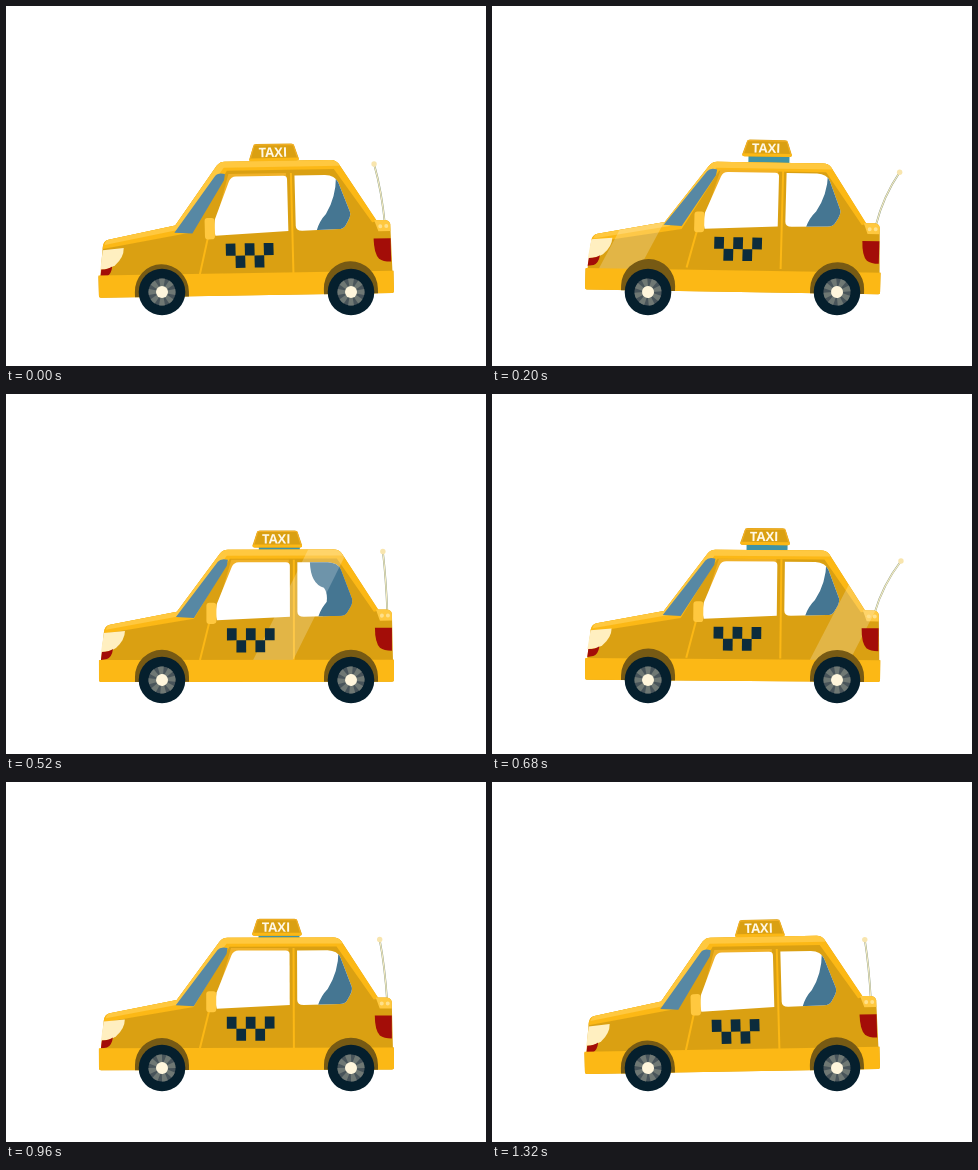
Write an HTML page that moves like this. It is 480 px wide and 360 px high and loops after 1360 ms.

```html
<!DOCTYPE html>
<html lang="en">
<head>
<meta charset="utf-8">
<title>Taxi</title>
<style>
  html, body { margin: 0; width: 100%; height: 100%; overflow: hidden; background: #fff; }
  svg { display: block; width: 100vw; height: 100vh; }
  text { font: 700 13px "Open Sans", sans-serif; fill: #fff8e6; }
  .amber { fill: #daa012; }
  .bright { fill: #fcb815; }
  .light { fill: #ffc83f; }
  .glass { fill: #5788a4; }
  .deep { fill: #457692; }
  .navy { fill: #0c2c3c; }
  .red { fill: #a30d08; }
  .cream { fill: #ffefc0; }
  .seam { fill: none; stroke: #fcb815; stroke-width: 2; }
</style>
</head>
<body>
<svg viewBox="0 0 480 360">
  <defs>
    <path id="shell" d="M93 267V286Q93 288 95 288H386Q388 288 388 286V266H387L386 220Q385 216 380 216H372L336 160Q333 156 328 156H222Q217 156 214 160L171 218L104 231Q99 232 98 238L95 266Z"/>
    <path id="plate" d="M247 151L251 139Q252 137 254 137H289Q291 137 292 139L296 151Q297 154 294 154H249Q246 154 247 151Z"/>
    <path id="rearPane" d="M291.500 168.500H322Q332 169 335 176L346 205Q347 209 344 214L341 219Q339 222 334 222L298 223Q291.500 223 291.500 218Z"/>
    <path id="frontPane" d="M211 226.500Q209 220 211 210L226 173Q228 168.500 233 168.500H280Q284 168.500 284 172V223Z"/>
    <clipPath id="paint"><use href="#shell"/><use href="#plate"/></clipPath>
    <clipPath id="rearClip"><use href="#rearPane"/></clipPath>
    <clipPath id="frontClip"><use href="#frontPane"/></clipPath>
    <g id="hub">
      <circle r="13.500" fill="#48545a"/>
      <g id="blades" fill="#6f7874"></g>
      <circle r="6" fill="#fff6dc"/>
    </g>
  </defs>

  <g id="antenna">
    <path id="rod" fill="none" stroke="#8b9b86" stroke-width="1.800"/>
    <path id="rodCore" fill="none" stroke="#f6ecc0" stroke-width="1.100"/>
    <circle id="tip" r="2.700" fill="#f8e5ae"/>
  </g>

  <g id="car">
    <rect x="253" y="149" width="41" height="8" fill="#4093a4"/>
    <g id="sign">
      <use href="#plate" class="amber"/>
      <path class="bright" d="M247 151H296Q297 154 294 154H249Q246 154 247 151Z"/>
      <path fill="none" stroke="#f3b026" d="M248 151L252 138H291L295 151"/>
      <text x="270.500" y="150" text-anchor="middle">TAXI</text>
    </g>

    <use href="#shell" class="amber"/>
    <path class="bright" d="M98 240Q98 232 104 231L171 218L214 160Q217 156 222 156H328Q333 156 336 160L373 217L368 218L331 165H224L188 225Z"/>
    <path class="light" d="M100 236Q101 231.500 104 231L171 218L214 160Q217 156 222 156H328Q333 156 336 160L337 162H221L176 222Z"/>
    <path class="light" d="M370 216H380Q385 216 386 220V227H374Z"/>

    <g class="side">
      <path class="glass" d="M170 223L212 168Q215 164 222 166L221 172L188 224Z"/>
      <path class="seam" d="M204 226L194 266M288 166V266"/>
      <path fill="none" stroke="#f0b127" stroke-width="4" d="M211 222L227 168H283"/>
      <use href="#frontPane" fill="#fff"/>
      <use href="#rearPane" fill="#fff"/>
      <g clip-path="url(#rearClip)">
        <path class="deep" d="M333 168L350 200V224H312Q315 214 322 207Q333 190 333 168Z"/>
        <path id="rearTint" class="deep" d="M304 166H340L350 205V225H316Q325 203 318 194Q304 190 304 166Z"/>
        <path id="rearFill" class="deep" d="M309 166H340L350 205V225H314Q307 212 312 200Q315 190 309 166Z"/>
      </g>
      <g clip-path="url(#frontClip)">
        <path id="slash" stroke="#4d7b97" stroke-width="4.500" stroke-linecap="round" d="M248 217L264.500 187"/>
        <path id="frontFill" class="deep" d="M268 166H286V206L276 202Q264 216 257 215Q251 211 257 205Q274 195 268 166Z"/>
      </g>
      <rect class="light" x="200.500" y="209" width="10" height="21" rx="3"/>
    </g>

    <g clip-path="url(#paint)">
      <path id="shine" fill="#fff" fill-opacity=".22" d="M-13 295H27L107 135H67Z"/>
    </g>

    <g class="side">
      <g id="checks" class="navy"></g>
      <path class="cream" d="M98 239L119 237Q119 246 110 254Q104 258 95 258Z"/>
      <path class="red" d="M96 258Q103 258 107 255Q106 263 101 265L95 266Z"/>
    </g>
    <path class="red" d="M369 234H386V257Q378 257 374 254Q369 249 369 234Z"/>
    <path class="bright" d="M93 266H388V286Q388 288 386 288H95Q93 288 93 286Z"/>
    <path fill="#775a14" d="M129 288V283A27 27 0 0 1 183 283V288ZM318 288V283A27 27 0 0 1 372 283V288Z"/>
    <g fill="#ffe08a"><circle cx="376" cy="222" r="2"/><circle cx="382" cy="222" r="2"/></g>
  </g>

  <g id="wheels"></g>
</svg>
<script>
const LOOP = 1360, STEP = 40, BOUNCE = LOOP / 3;
const $ = id => document.getElementById(id);
const set = (id, name, value) => $(id).setAttribute(name, value);
const show = (id, on) => set(id, 'visibility', on ? 'visible' : 'hidden');
const range = n => [...Array(n).keys()];

// Body pitch over one bounce: [phase, amount]
const PITCH = [[0, 1], [.147, .05], [.3, -.8], [.43, -1], [.56, 0], [.75, .95], [.87, 1.05], [1, 1]];

function pitchAt(phase) {
  const i = PITCH.findIndex(([at]) => at > phase);
  const [a, from] = PITCH[i - 1], [b, to] = PITCH[i];
  const u = (phase - a) / (b - a);
  return from + (to - from) * u * u * (3 - 2 * u);
}

$('checks').innerHTML = range(5).map(i =>
  `<rect x="${221 + i * 9.5}" y="${i % 2 ? 246.5 : 234.5}" width="9.700" height="12"/>`).join('');

$('blades').innerHTML = range(8).map(i =>
  `<path d="M-1.500 -5L-3 -13.200A13.500 13.500 0 0 1 3 -13.200L1.500 -5Z" transform="rotate(${i * 45})"/>`).join('');

$('wheels').innerHTML = [156, 345].map(x =>
  `<g transform="translate(${x} 286)"><circle r="23.300" fill="#051f2d"/><use class="hub" href="#hub"/></g>`).join('');
const hubs = document.querySelectorAll('.hub');
const sides = document.querySelectorAll('.side');

function draw(t) {
  const phase = (t % BOUNCE) / BOUNCE;
  const p = pitchAt(phase), swing = Math.cos((phase - .01) * 2 * Math.PI);

  // Rock about the rear axle with a little squash and lean
  const lean = .026 * p, slope = -.0165 * p, squash = .016 * p;
  const drop = 1.2 * p - .3 - slope * 275 - squash * 288;
  set('car', 'transform', `matrix(1 ${slope} ${lean} ${1 + squash} ${-lean * 288} ${drop})`);
  set('sign', 'transform', `translate(0 ${2 * p + 1.2 * swing - 1})`);
  sides.forEach(s => s.setAttribute('transform', `translate(0 ${2.2 * p})`));

  const x = 390 - 20.5 * swing - 1.5 * (2 * swing * swing - 1);
  const y = 157.5 + 9 * ((x - 376) / 32) ** 2;
  const baseX = 381.5 - 2.5 * p;
  const rod = `M${baseX} 219Q${baseX + (x - baseX) * .3} ${185 + (y - 158) * .7} ${x} ${y}`;
  set('rod', 'd', rod);
  set('rodCore', 'd', rod);
  set('tip', 'cx', x);
  set('tip', 'cy', y);

  set('shine', 'transform', `translate(${105 + .44 * (t - 200)} 0)`);
  show('slash', t >= 320 && t < 440);
  show('rearTint', t >= 440 && t < 640);
  show('rearFill', t >= 1080 && t < 1240);
  show('frontFill', t >= 1080 && t < 1240);
  hubs.forEach(h => h.setAttribute('transform', `rotate(${-720 * t / LOOP})`));
}

function tick() {
  draw(Math.floor(performance.now() % LOOP / STEP) * STEP);
  requestAnimationFrame(tick);
}
tick();
</script>
</body>
</html>
```
